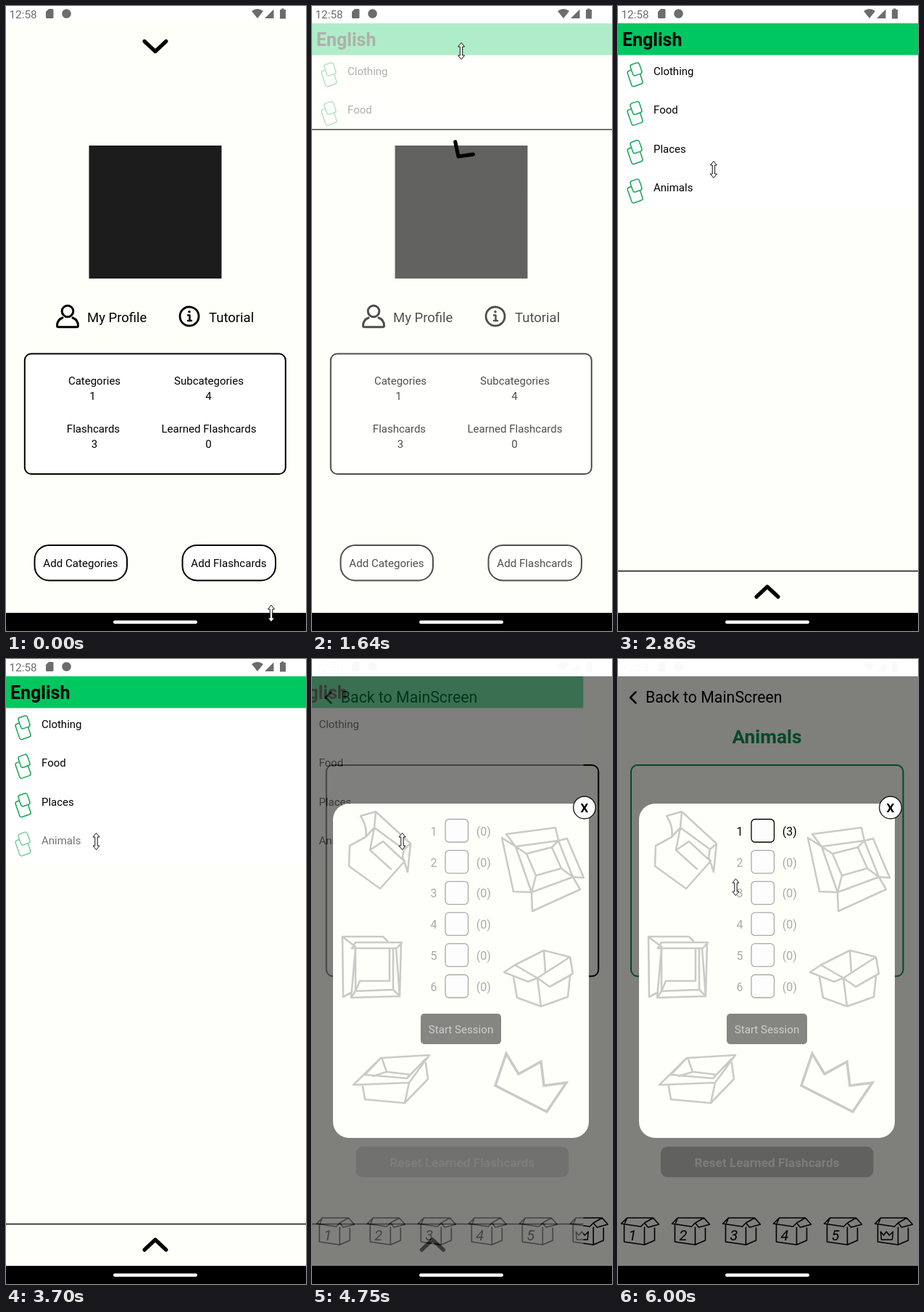
Write an HTML page that moves like this. It is 414 px wide and 860 px high and loops after 6.03 s.

```html
<!DOCTYPE html>
<html lang="en">
<head>
<meta charset="utf-8">
<title>Flashcard app</title>
<style>
  html, body { margin: 0; width: 100%; height: 100%; overflow: hidden; background: #fffffa; }
  svg { display: block; width: 100%; height: 100%; font-family: Roboto, sans-serif; }
  .mid { text-anchor: middle; }
  .line { fill: none; stroke-linecap: round; stroke-linejoin: round; }
</style>
</head>
<body>
<svg id="stage" viewBox="0 0 414 860"></svg>
<script>
const LOOP = 6030;
const PAPER = '#fffffa';
const stage = document.getElementById('stage');

const rect = (x, y, w, h, r, attrs) =>
  `<rect x="${x}" y="${y}" width="${w}" height="${h}" rx="${r}" ${attrs}/>`;
const text = (x, y, size, str, attrs = '') =>
  `<text x="${x}" y="${y}" font-size="${size}" ${attrs}>${str}</text>`;
const mid = (x, y, size, str, attrs = '') => text(x, y, size, str, `class="mid" ${attrs}`);
const line = (d, width, color = '#000', attrs = '') =>
  `<path class="line" d="${d}" stroke="${color}" stroke-width="${width}" ${attrs}/>`;

function homeContent() {
  const stats = [['Categories', 122, 521], ['Subcategories', 280, 521],
                 ['Flashcards', 120.5, 587], ['Learned Flashcards', 280, 587]];
  const counts = [['1', 119.5, 542], ['4', 279.5, 542], ['3', 122, 608], ['0', 279.5, 608]];
  const outline = 'fill="#fff" stroke="#000" stroke-width="2"';
  return rect(114.5, 192, 183, 183, 0, 'fill="#1c1c1c"') +
    `<circle cx="85" cy="420" r="7.8" class="line" stroke="#000" stroke-width="3"/>` +
    line('M78 429C73 431 70.5 435 70.5 440Q70.5 441.8 72.5 441.8H97.5Q99.5 441.8 99.5 440C99.5 435 97 431 92 429', 3) +
    text(112, 434.5, 18.5, 'My Profile') +
    `<circle cx="253" cy="427" r="13" class="line" stroke="#000" stroke-width="2.8"/>` +
    line('M251 425.5H253.5V433M251 433H256', 2.4) + `<circle cx="253" cy="420.7" r="1.8"/>` +
    text(280, 434.5, 18.5, 'Tutorial') +
    rect(25.8, 478.5, 360, 165.5, 9, outline) +
    [...stats, ...counts].map(([s, x, y]) => mid(x, y, 15, s)).join('') +
    rect(39.5, 742, 127.5, 48.5, 20, outline) + mid(103, 772, 15.1, 'Add Categories') +
    rect(243.5, 742, 128.5, 48.5, 20, outline) + mid(307.5, 772, 15.1, 'Add Flashcards');
}

function listRow(name, i) {
  const card = 'fill="#fff" stroke="#17a656" stroke-width="1.5"';
  return `<g id="row${i}" transform="translate(0 ${i * 53.4})">` +
    `<g transform="rotate(-19 23 95)">` +
    rect(14.5, 87, 16, 22.5, 3, card) + rect(21, 80, 13, 16, 3, card) + `</g>` +
    text(49, 95, 15, name) + `</g>`;
}

function smallBox(i) {
  const mark = i < 5
    ? text(-16, 800, 20, i + 1, 'font-style="italic"')
    : line('M-18 788L-17 799H-2L-1 788L-6 793L-10 788L-14 793Z', 1.5);
  return `<g transform="translate(${30.5 + i * 70} 0)">` +
    line('M-22 779V802L6 806L20 800V783M6 782V806M-26 777L-18 769H18L26 778L11 782L6 776L1 781ZM-18 769L-21 776M6 776L18 769', 1.6) +
    mark + `</g>`;
}

const sessionRow = i => {
  const y = 236.5 + i * 42.8;
  return `<g id="box${i}" fill="#a9a9a6" stroke="none">` +
    mid(168, y + 6.2, 16, i + 1) +
    rect(184, y - 16, 31.5, 31.5, 5, 'fill="#fdfdfd" stroke="#a9a9a6" stroke-width="1.3"') +
    mid(236.7, y + 6.2, 16, '(0)') + `</g>`;
};

const sketches = [
  'M67 216L88 210L136 254L132 293L125 272M67 216C73 225 76 235 74 245L52 257L51 285L94 316L128 278M88 210L86 232L74 245M86 232L127 262L125 272M86 232L80 263L109 289M127 262L136 254M80 263L98 251L125 276',
  'M281 258L340 250L360 300L303 321ZM296 268L331 259L344 288L309 298ZM281 258L296 268M340 250L331 259M360 300L344 288M303 321L309 298M281 258L268 241L336 232L340 250L352 247L375 301L360 300L370 317L304 347L303 321L278 320L262 246L281 258',
  'M42 382H98L104 388M42 382L43 465L54 459M42 382L60 396M60 390L124 390L117 398H55ZM60 398L54 466L121 464L123 390M60 398V457M116 398L121 464M60 457L112 455L121 464M112 455V398M66 443H107V398M66 443L60 457M54 466L60 457',
  'M280 421L320 401L356 410L311 439ZM280 421L265 431L298 444L311 439L328 451L360 433L356 410M278 437L283 466L316 478L353 465L356 437M311 439L316 478M320 401L322 431',
  'M95 549L162 545L134 583L57 586ZM73 572L131 577L157 550M73 572L95 549M70 588L73 606L128 611L160 578L157 556M134 583L128 611M97 551L103 568L136 572M103 568L84 574'
];

function modal() {
  return rect(29, 199, 353, 460, 22, `fill="${PAPER}"`) +
    sketches.map(d => line(d, 2.6, '#cacac7')).join('') +
    line('M268 543L285 571L316 554L320 587L351 583L324 623Q290 606 253 587Z', 3.6, '#cacac7', 'style="stroke-linejoin:miter"') +
    [0, 1, 2, 3, 4, 5].map(sessionRow).join('') +
    rect(150, 488, 111, 42, 5, 'fill="#858582"') +
    mid(205.5, 515, 15.1, 'Start Session', 'fill="#cececb"') +
    `<circle cx="376" cy="204.5" r="15.3" fill="#fff" stroke="#000" stroke-width="1.2"/>` +
    mid(376, 210.7, 17, 'X', 'font-weight="700"');
}

function statusBar() {
  return rect(0, 0, 414, 23.5, 0, 'fill="#fff"') +
    `<g id="status" fill="#6c6c6c">` + text(4.5, 16.5, 15.3, '12:58') +
    `<path d="M59 4H64Q65.5 4 65.5 5.5V15.5Q65.5 17 64 17H56.5Q55 17 55 15.5V8Z"/>` +
    `<circle cx="83.5" cy="10.5" r="6.3"/>` +
    `<path d="M347 17L339 7Q347 1 355 7ZM357 17L369.5 4.5V17ZM380 3.5H383.500V5H386V17.500H378V5H380Z"/></g>`;
}

stage.innerHTML =
  `<defs><clipPath id="sheetClip"><rect id="sheetRect" x="0" y="23" width="414" height="812"/></clipPath></defs>` +
  rect(0, 0, 414, 860, 0, `fill="${PAPER}"`) +
  `<g id="next">` + rect(0, 23, 414, 812, 0, `fill="${PAPER}"`) +
    line('M24.500 45.500L17 53L24.500 60.500', 2.5) +
    text(38, 60, 21.3, 'Back to MainScreen') +
    mid(205.5, 116, 26.3, 'Animals', 'id="title" fill="#00964a" font-weight="700"') +
    rect(18, 146, 375.5, 290.5, 9, 'id="card" fill="none" stroke-width="2"') +
    rect(59, 671, 293.5, 42, 9, 'fill="#c3c3c1"') +
    mid(205.5, 699, 17.2, 'Reset Learned Flashcards', 'fill="#fafaf7" font-weight="700"') +
    [0, 1, 2, 3, 4, 5].map(smallBox).join('') + `</g>` +
  `<g id="old">` + rect(0, 23, 414, 812, 0, `fill="${PAPER}"`) +
    `<g id="list">` + rect(0, 67, 414, 213, 0, 'fill="#fff"') +
      rect(0, 23.5, 414, 44, 0, 'fill="#00c75f"') +
      text(6, 55, 25, 'English', 'font-weight="700"') +
      ['Clothing', 'Food', 'Places', 'Animals'].map(listRow).join('') + `</g>` +
    `<g clip-path="url(#sheetClip)">` + rect(0, 23, 414, 812, 0, `fill="${PAPER}"`) +
      `<g id="home">${homeContent()}</g></g>` +
    `<path id="edge" d="M0 0H414" stroke="#111" stroke-width="1.3"/>` +
    line('M-15 -7L0 7L15 -7', 5.2, '#000', 'id="chevron"') + `</g>` +
  `<g id="dialog">` + rect(0, 23.5, 414, 812, 0, 'fill="#000" opacity=".5"') + modal() + `</g>` +
  statusBar() +
  rect(0, 835, 414, 25, 0, '') + rect(148, 845.5, 116, 4.500, 2.2, 'fill="#fff"') +
  `<circle id="tap" r="12" fill="#fff000" opacity=".62"/>` +
  `<path id="cursor" d="M0 -11.500L4.500 -6H1.700V6H4.500L0 11.500L-4.500 6H-1.700V-6H-4.500Z" fill="#fff" stroke="#111"/>`;

const el = {};
stage.querySelectorAll('[id]').forEach(node => { el[node.id] = node; });
const set = (id, attrs) => {
  for (const key in attrs) el[id].setAttribute(key, attrs[key]);
};
const show = (id, on) => set(id, { visibility: on ? 'visible' : 'hidden' });

const span = (t, a, b) => Math.min(1, Math.max(0, (t - a) / (b - a)));
const mix = (a, b, p) => a + (b - a) * p;
const smooth = p => p * p * (3 - 2 * p);

// time, x, y
const route = [
  [20, 366, 836], [120, 342, 745], [300, 262, 420], [480, 192, 140], [610, 201, 74],
  [640, 201, 73], [880, 206, 62], [1810, 206, 62], [1990, 206, 76], [2140, 206, 76],
  [2400, 174, 102], [2700, 142, 190], [2980, 124.5, 251], [5870, 124.5, 251], [6000, 162.5, 314]
];

function cursorAt(t) {
  const i = route.findIndex(k => k[0] >= t);
  if (i < 0) return route[route.length - 1].slice(1);
  if (i === 0) return route[0].slice(1);
  const a = route[i - 1], b = route[i], p = span(t, a[0], b[0]);
  return [mix(a[1], b[1], p), mix(a[2], b[2], p)];
}

function draw(t) {
  // home sheet collapses to the bottom
  const p = smooth(span(t, 1480, 2050));
  const top = mix(23, 777, p);
  set('sheetRect', { y: top, height: 835 - top });
  set('home', { opacity: Math.max(0, 1 - p * 1.6) });
  set('list', { opacity: Math.min(1, p * 1.6) });
  set('edge', { transform: `translate(0 ${top + 0.5})`, opacity: Math.min(1, p * 4) });
  set('chevron', { transform: `translate(206 ${top + mix(32.5, 29, p)}) rotate(${180 * p})` });

  // pressed list row
  const press = t < 3600 ? mix(1, 0.2, span(t, 3390, 3540)) : mix(0.2, 1, smooth(span(t, 3600, 3820)));
  set('row3', { opacity: press });

  // page change
  const u = span(t, 4560, 4940);
  const slide = 1 - Math.pow(1 - u, 4.5);
  show('next', u > 0);
  show('old', u < 1);
  set('next', { transform: `translate(${41.4 * (1 - slide)} 0)` });
  set('old', { transform: `translate(${-41.4 * slide} 0)`, opacity: Math.min(1, (1 - u) * 1.08) });
  show('dialog', t >= 4460);
  set('status', { opacity: mix(1, 0.03, span(t, 4060, 4200)) });

  // loaded data
  const ready = smooth(span(t, 5330, 5480));
  set('title', { opacity: ready });
  set('card', { stroke: `rgb(0,${Math.round(150 * ready)},${Math.round(74 * ready)})` });
  const shade = Math.round(169 * (1 - ready));
  const ink = `rgb(${shade},${shade},${shade})`;
  set('box0', { fill: ink });
  el.box0.children[1].setAttribute('stroke', ink);
  el.box0.children[2].textContent = ready > 0 ? '(3)' : '(0)';

  const [x, y] = cursorAt(t);
  set('cursor', { transform: `translate(${x} ${y})` });
  set('tap', { cx: x, cy: y });
  show('tap', (t >= 1180 && t < 1420) || (t >= 3370 && t < 3600));
}

const start = performance.now();
function tick() {
  draw((performance.now() - start) % LOOP);
  requestAnimationFrame(tick);
}
tick();
</script>
</body>
</html>
```
